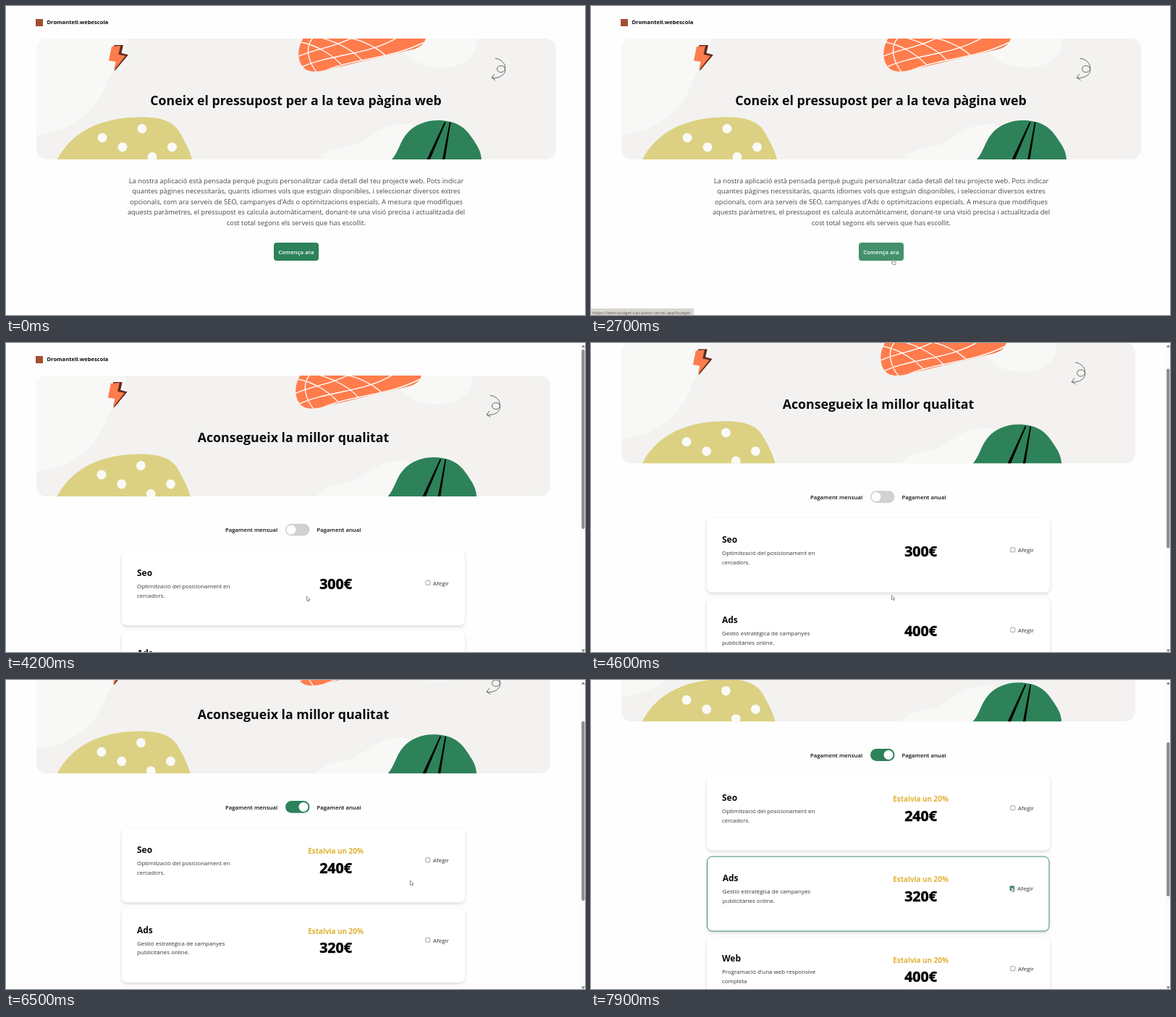
Animation of 800x427 px, one loop 8000 ms. Source, as an HTML page:

```html
<!DOCTYPE html>
<html lang="ca">
<head>
<meta charset="utf-8">
<title>Pressupost web</title>
<style>
  html, body { margin: 0; width: 100%; height: 100%; overflow: hidden; background: #fefefe; }
  svg { display: block; width: 800px; height: 427px; }
  text { font-family: "Open Sans", "Noto Sans", sans-serif; fill: #0b0b0b; white-space: pre; }
  .b { font-weight: 700; }
  .s { font-weight: 600; }
  .intro { fill: #484848; }
  .desc { fill: #333; }
  .save { font-weight: 700; fill: #e0b135; }
  .price { font-weight: 700; fill: #000; stroke: #000; stroke-width: .5; }
  .btn { font-weight: 600; fill: #fff; }
  .url { fill: #5c5a58; }
  .card { filter: drop-shadow(0 2.6px 2.2px rgba(0, 0, 0, .14)); }
</style>
</head>
<body>
<svg viewBox="0 0 800 427" xmlns="http://www.w3.org/2000/svg">
  <defs>
    <clipPath id="frame"><rect x="42" y="45" width="718" height="167" rx="14"/></clipPath>
    <clipPath id="carrot"><path d="M411 44C402 58 402 75 411 85C418 92 430 92 448 87L562 60Q578 56 580 44Z"/></clipPath>
    <g id="hero" clip-path="url(#frame)">
      <path fill="#f3f2f0" d="M42 45H760V212H42Z"/>
      <g fill="#f8f8f7">
        <path d="M42 45H167C166 70 150 82 140 105C125 145 95 172 42 178Z"/>
        <path d="M540 45H650C652 70 632 86 600 85C570 84 548 70 540 45Z"/>
        <path d="M434 212C440 198 462 196 482 192C505 182 520 160 560 163L600 212Z"/>
      </g>
      <path fill="#dcd182" d="M71 212C88 179 124 154 185 153.500C220 153 234 162 242 178C250 193 254 200 257 212Z"/>
      <g fill="#fafaf8">
        <circle cx="133" cy="182" r="6.500"/><circle cx="161" cy="195" r="6.500"/>
        <circle cx="188" cy="169.500" r="6.500"/><circle cx="229.500" cy="195" r="6.500"/>
        <circle cx="202" cy="208.500" r="6.500"/>
      </g>
      <g clip-path="url(#carrot)">
        <path fill="#ff7c4c" d="M400 44H582V94H400Z"/>
        <path fill="none" stroke="#fff" stroke-width="1.400" d="M403 70C430 58 452 58 478 44M409 84C450 66 500 68 540 44M440 90C480 72 530 74 578 50M407 50C430 54 452 68 466 84M436 44C458 50 482 62 494 78M474 44C496 48 516 60 526 70M424 44C412 58 418 78 430 92"/>
      </g>
      <path fill="#2d825a" d="M533 212C543 201 544 187 555 175C565 164 580 158 597 158C620 158 634 167 643 181C652 194 656 200 657 212Z"/>
      <path d="M606 160L581.500 212H586L607.500 161ZM613 160L603 212H606.500L614.500 161Z"/>
      <path fill="#5d2c1d" d="M149 54H162L159.500 65L169 67.500L150 90L154 75Z"/>
      <path fill="#ff7c4c" d="M146 56L158 55L155.500 67L165 69L149 89L151.500 77L142 75.500Z"/>
      <path fill="none" stroke="#555" stroke-width=".9" d="M676 72.500C684 73 691 80 689.500 87.500C688 93 679 93 678.500 87C679 81.500 687 81 689.500 86C692 95 680 101 671 99M675 94L671 99L676.500 102.500"/>
    </g>
  </defs>
  <g id="scene"></g>
</svg>
<script>
const LOOP = 8000, GREEN = '#2d825a';
const NEXT_PAGE = 3100, TOGGLE = 5600, CHECK = 7600;

const scrollKeys = [[4250, 0], [4500, 45.5], [6350, 45.5], [6735, 154.6]];
const cursorKeys = [
  [600, 505, 408], [1000, 450, 377], [1400, 450, 377], [2200, 415.5, 350],
  [4550, 415.5, 350], [5350, 406.5, 219], [5900, 406.5, 219], [6550, 561, 278],
  [7000, 561, 278], [7500, 581, 286]
];

const intro = [
  'La nostra aplicació està pensada perquè puguis personalitzar cada detall del teu projecte web. Pots indicar',
  'quantes pàgines necessitaràs, quants idiomes vols que estiguin disponibles, i seleccionar diversos extres',
  'opcionals, com ara serveis de SEO, campanyes d\'Ads o optimitzacions especials. A mesura que modifiques',
  'aquests paràmetres, el pressupost es calcula automàticament, donant-te una visió precisa i actualitzada del',
  'cost total segons els serveis que has escollit.'
];
const services = [
  ['Seo', 300, 'Optimització del posicionament en', 'cercadors.'],
  ['Ads', 400, 'Gestió estratègica de campanyes', 'publicitàries online.'],
  ['Web', 500, 'Programació d\'una web responsive', 'completa']
];

const clamp01 = u => Math.max(0, Math.min(1, u));
const ease = u => u * u * (3 - 2 * u);

// Eased value of one column of a keyframe list
function keyed(keys, t, col = 1) {
  let value = keys[0][col];
  for (let i = 1; i < keys.length; i++) {
    const [a, b] = [keys[i - 1], keys[i]];
    value += (b[col] - a[col]) * ease(clamp01((t - a[0]) / (b[0] - a[0])));
  }
  return value;
}

const text = (x, y, size, cls, str, anchor = 'start') =>
  `<text x="${x}" y="${y}" font-size="${size}" class="${cls}" text-anchor="${anchor}">${str}</text>`;
const rect = (x, y, w, h, rx, fill, more = '') =>
  `<rect x="${x}" y="${y}" width="${w}" height="${h}" rx="${rx}" fill="${fill}" ${more}/>`;

const header = rect(41, 18, 10, 10, 0, '#a24f30') + text(56.5, 25.4, 7.6, 'b', 'Dromantell.webescola');

function homePage(hover) {
  return header + '<use href="#hero"/>' +
    text(400.5, 136.7, 17.75, 'b', 'Coneix el pressupost per a la teva pàgina web', 'middle') +
    intro.map((line, i) => text(401, 244.6 + 14.63 * i, 9.36, 'intro', line, 'middle')).join('') +
    rect(370, 327, 62, 25, 4, hover ? '#43916c' : GREEN) +
    text(400.8, 342.9, 7.8, 'btn', 'Comença ara', 'middle');
}

function toggle(u) {
  const mix = (a, b) => Math.round(a + (b - a) * u);
  const fill = `rgb(${mix(209, 45)},${mix(209, 130)},${mix(211, 90)})`;
  return rect(386, 249.7, 33.5, 16.8, 8.4, fill) +
    `<circle cx="${394 + 17 * u}" cy="258.1" r="6.5" fill="#fff"/>`;
}

function card([name, price, line1, line2], y, annual, picked) {
  const inset = picked ? 0.7 : 0, y1 = y + inset / 2;
  const box = picked
    ? rect(160.5, y + .5, 472.5, 103, 7, '#fff', `class="card" stroke="${GREEN}" stroke-width=".9"`)
    : rect(160, y, 474, 102.5, 7, '#fff', 'class="card"');
  const check = picked
    ? rect(578.6, y1 + 40.6, 6.6, 6.6, 1, GREEN) +
      `<path d="M580 ${y1 + 44}l1.500 1.500l2.500 -3" fill="none" stroke="#fff" stroke-width=".8"/>`
    : rect(579.8, y + 40.8, 6, 6, 1, '#fff', 'stroke="#777" stroke-width=".7"');
  return box +
    text(181 + inset, y1 + 34.4, 12, 'b', name) +
    text(181 + inset, y1 + 51.4, 7.95, 'desc', line1) +
    text(181 + inset, y1 + 64, 7.95, 'desc', line2) +
    (annual ? text(455.5, y1 + 35.6, 9.9, 'save', 'Estalvia un 20%', 'middle') : '') +
    text(455.5, y1 + (annual ? 62 : 52.6), 19.6, 'price', (annual ? price * .8 : price) + '€', 'middle') +
    check + text(590 - inset, y1 + 47.1, 8, 'desc', 'Afegir');
}

function scrollbar(scroll, height) {
  const k = 410 / height;
  return rect(793, 0, 7, 427, 0, '#fbfbfb') +
    rect(795.3, 9 + scroll * k, 4.2, 427 * k, 2, '#8b8b8b') +
    '<path fill="#7d7d7d" d="M795 6L797.500 2.500L800 6ZM795 423.500L797.500 427L800 423.500Z"/>';
}

function budgetPage(t) {
  const scroll = keyed(scrollKeys, t), picked = t >= CHECK;
  const cards = services.map((s, i) =>
    card(s, 287.5 + 110.6 * i + (picked && i > 1 ? .9 : 0), t >= TOGGLE, picked && i === 1));
  return `<g transform="translate(0 ${-scroll})">` + header +
    '<use href="#hero" transform="translate(42 0) scale(.989 1) translate(-42 0)"/>' +
    text(397, 136.7, 17.75, 'b', 'Aconsegueix la millor qualitat', 'middle') +
    text(303, 261.3, 7.75, 's', 'Pagament mensual') +
    toggle(ease(clamp01((t - TOGGLE) / 200))) +
    text(429.5, 261.3, 7.75, 's', 'Pagament anual') +
    cards.join('') + '</g>' + scrollbar(scroll, picked ? 822 : 706);
}

function cursor(t, hand) {
  if (t < cursorKeys[0][0]) return '';
  const shape = hand
    ? 'M1 0.500Q2 -.5 2.500 .8V3L5.500 3.800Q6 5.500 5 7.500H2L-.5 4.500L1 4.600Z'
    : 'M0 0V6.200L1.500 5L2.600 7.300L3.600 6.800L2.600 4.600H4.600Z';
  return `<path transform="translate(${keyed(cursorKeys, t)} ${keyed(cursorKeys, t, 2)})" d="${shape}" fill="#fff" stroke="#666" stroke-width=".7"/>`;
}

const statusBar = rect(0, 418, 142, 9, 0, '#d9d5d0') +
  text(2, 425.6, 6, 'url', 'https://web-budget-calculator.vercel.app/budget');

const scene = document.getElementById('scene');
let shown = '';

function draw(now) {
  const t = now % LOOP, home = t < NEXT_PAGE;
  const onButton = home && t >= 2150;
  const onToggle = t >= 5250 && t < 6050;
  const next = (home ? homePage(onButton) : budgetPage(t)) +
    (home && t >= 2300 ? statusBar : '') + cursor(t, onButton || onToggle);
  if (next !== shown) scene.innerHTML = shown = next;
  requestAnimationFrame(draw);
}
draw(performance.now());
</script>
</body>
</html>
```
